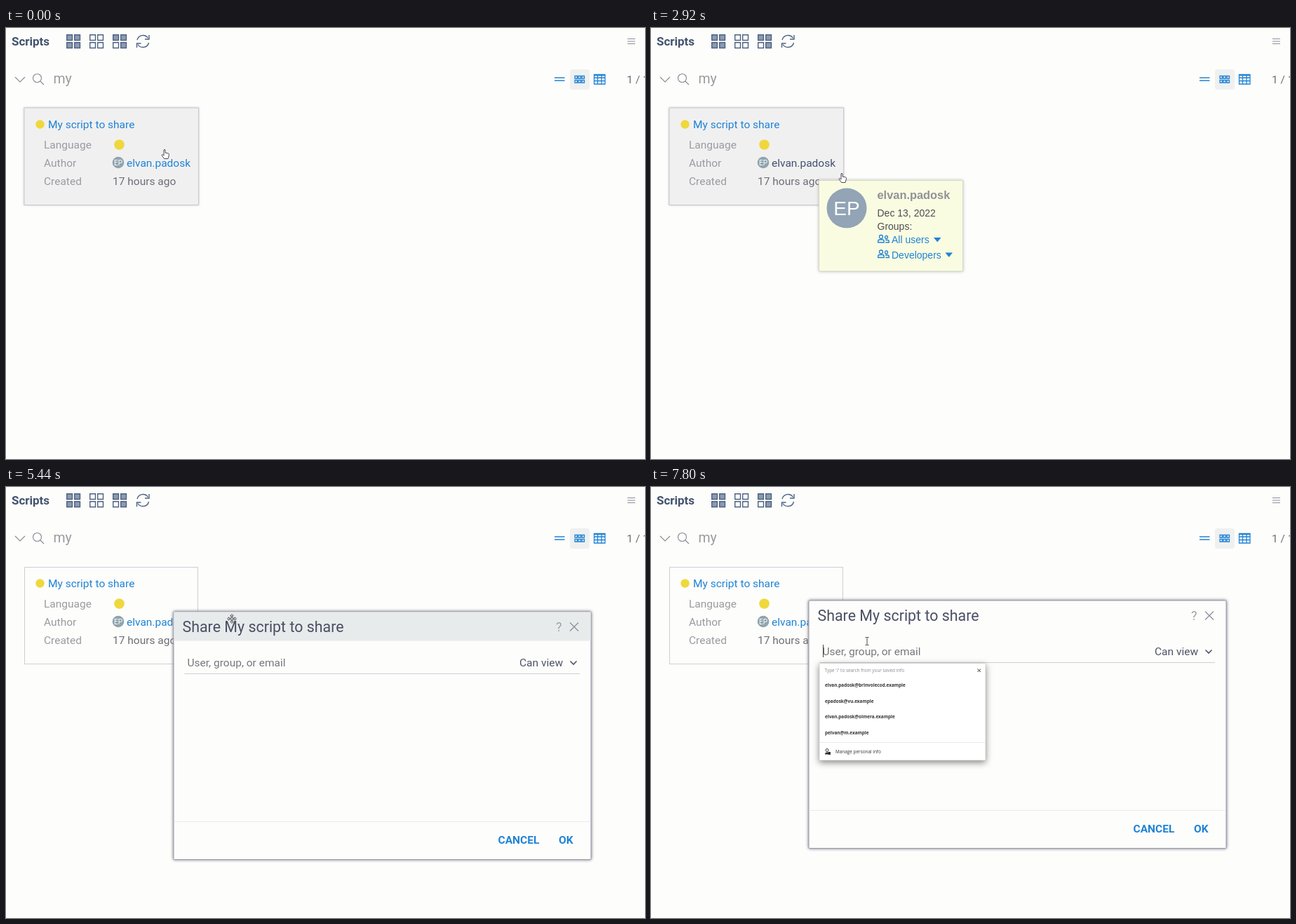
Write an HTML page that moves like this. It is 911x615 px and loops after 8 s.

```html
<!DOCTYPE html>
<html lang="en">
<head>
<meta charset="utf-8">
<title>Sharing a script</title>
<style>
  html, body { margin: 0; width: 100%; height: 100%; overflow: hidden; background: #fdfdfb; }
  svg { display: block; width: 911px; height: 615px; font: 15.5px Roboto, sans-serif; }
  text { white-space: pre; }
  .link { fill: #2083d5; }
  .label { fill: #9a9ba0; }
  .value { fill: #6d6e76; }
  .dark { fill: #42526e; }
  .bold { font-weight: 700; }
  .line { fill: none; stroke: #4d6282; stroke-width: 1.4; }
  .grey { fill: none; stroke: #8b8e98; stroke-width: 1.2; }
  .blue { fill: none; stroke: #2083d5; stroke-width: 1.3; }
  .arial { font-family: "Liberation Sans", Arial, sans-serif; font-size: 14px; }
  .small { font: 6.4px "Open Sans", "Noto Sans", sans-serif; fill: #333; }
  #menu { filter: drop-shadow(0 0 2px #9fb0c4aa); }
  #tip { filter: drop-shadow(0 0 2px #8888); }
  #dialog > .panel { filter: drop-shadow(0 0 2px #667); }
  #popup > .panel { filter: drop-shadow(0 3px 5px #0007); }
  #cardHover { filter: drop-shadow(0 0 1.5px #9999); }
  #cursor path { fill: #fff; stroke: #4a4a50; stroke-width: 1; stroke-linejoin: round; }
  #cursor .thin { fill: none; }
</style>
</head>
<body>
<svg viewBox="0 0 911 615">
  <defs>
    <path id="quad" d="M.7 9.7h7.8v7.8H.7zm11 0h7.8v7.8h-7.8zm-11 11h7.8v7.8H.7zm11 0h7.8v7.8h-7.8z"/>
    <g id="people" class="blue" stroke-width="1">
      <circle cx="5" cy="3" r="2.5"/><circle cx="12.5" cy="3.5" r="2"/>
      <path d="M.7 11V9.5q0-2.500 2.500-2.500h3.500q2.500 0 2.500 2.500V11zM11 7.500h3q2.300 0 2.300 2.200V11h-5"/>
    </g>
  </defs>

  <!-- toolbar -->
  <text x="8" y="25" class="dark bold" font-size="17">Scripts</text>
  <use href="#quad" x="86" class="line" style="fill:#8c9bb1"/>
  <use href="#quad" x="119" class="line"/>
  <path d="M153 10h8v8h-8zm11 0h8v8h-8zm0 11h8v8h-8z" fill="#8c9bb1"/>
  <use href="#quad" x="152" class="line"/>
  <path class="line" d="M187 17a8.500 8.500 0 0 1 15.500-2.500M204 10v6h-6M203.500 21a8.500 8.500 0 0 1-15.500 2.500M186.500 28v-6h6"/>
  <path class="grey" d="M886 15.500h11m-11 3.500h11m-11 3.500h11"/>

  <!-- search row -->
  <path class="grey" d="M13 70l7 7 7-7"/>
  <path class="grey" stroke-width="1.4" d="M50.500 71.500a6 6 0 1 0-12 0a6 6 0 1 0 12 0M49 76l5 5"/>
  <text x="67.500" y="79" class="label" font-size="19.500">my</text>
  <rect x="804" y="59" width="28" height="29" rx="4" fill="#eff0f0"/>
  <path class="blue" d="M782 71h14.500m-14.500 4h14.500"/>
  <path class="blue" stroke-width="1" d="M811 68.500h3.500v3.500H811zm5 0h3.500v3.500H816zm5 0h3.500v3.500H821zM811 74.500h3.500v3.500H811zm5 0h3.500v3.500H816zm5 0h3.500v3.500H821z"/>
  <path class="blue" d="M838.500 66.500h15.500v13.500h-15.500zm0 1h15.500m-15.500 3.500h15.500m-15.500 4.500h15.500M843.500 67v13m5.500-13v13"/>
  <text x="885" y="79" class="value">1 / 1</text>

  <!-- card -->
  <rect x="26.500" y="114.500" width="247" height="138" fill="none" stroke="#cdcfda"/>
  <rect id="cardHover" x="26" y="114" width="248.500" height="138.500" fill="#f0f0f1" stroke="#c9cad6"/>
  <circle cx="48.500" cy="137.500" r="6.200" fill="#efd83d"/>
  <text x="60" y="143" class="link">My script to share</text>
  <text x="54" y="171.500" class="label">Language</text>
  <circle cx="161.500" cy="166.500" r="7.300" fill="#efd83d"/>
  <text x="54" y="197.500" class="label">Author</text>
  <circle cx="160" cy="192" r="8.300" fill="#90a4ae"/>
  <text x="160" y="195.700" text-anchor="middle" font-size="10" fill="#fff">EP</text>
  <text id="author" x="172" y="197.500" class="link">elvan.padosk</text>
  <text x="54" y="223.500" class="label">Created</text>
  <text x="152" y="223.500" class="value">17 hours ago</text>

  <!-- context menu -->
  <g id="menu">
    <rect x="200.500" y="154.500" width="214" height="128" rx="1" fill="#e7ecee" stroke="#b3c1d1"/>
    <g class="dark">
      <text x="231.500" y="180.500">Run...</text>
      <text x="231.500" y="209.500">Share...</text>
      <text x="231.500" y="238">Edit...</text>
      <text x="231.500" y="267">Delete</text>
    </g>
  </g>

  <!-- author tooltip -->
  <g id="tip" class="arial">
    <rect x="239.500" y="217.500" width="205" height="129.500" fill="#fafce2" stroke="#d5d9c8"/>
    <circle cx="279" cy="257" r="28.500" fill="#92a4b5"/>
    <text x="279" y="266.500" text-anchor="middle" font-size="28" fill="#fff">EP</text>
    <text x="322.500" y="243.500" class="bold" font-size="16.400" fill="#919296">elvan.padosk</text>
    <text x="322.500" y="268.500" fill="#4d4d50">Dec 13, 2022</text>
    <text x="322.500" y="287.500" fill="#4d4d50">Groups:</text>
    <use href="#people" x="323" y="295"/>
    <use href="#people" x="323" y="316.500"/>
    <g class="link">
      <text x="343" y="307">All users</text>
      <text x="343" y="328.500">Developers</text>
      <path d="M403 299h10.500l-5.200 6.500zm16.500 21.500H430l-5.200 6.500z"/>
    </g>
  </g>

  <!-- share dialog, placed where it opens -->
  <g id="dialog">
    <rect class="panel" x="311" y="226" width="595" height="353.500" rx="1" fill="#fdfdfc" stroke="#9c9db0"/>
    <rect id="bar" x="311.500" y="226.500" width="594" height="41" fill="#e7ebec"/>
    <text x="323.500" y="254.500" font-size="21.400" fill="#4b4f64">Share My script to share</text>
    <text x="856" y="253.500" font-size="18" fill="#a0a2aa">?</text>
    <path class="grey" stroke="#a0a2aa" d="M876 241.500l12 12m0-12l-12 12"/>
    <text x="330.500" y="303.500" fill="#77787c">User, group, or email</text>
    <path id="caret" d="M331.500 289v18" stroke="#444"/>
    <text x="804" y="304" fill="#4f5366">Can view</text>
    <path d="M876.500 296.500l4.500 4.500 4.500-4.500" fill="none" stroke="#4f5366" stroke-width="1.600"/>
    <path d="M326.500 314.500h563.500" stroke="#cfd0d4"/>
    <path d="M311.500 525.500h594" stroke="#eaebef"/>
    <text x="773.500" y="557" class="link bold">CANCEL</text>
    <text x="860" y="557" class="link bold">OK</text>
  </g>

  <!-- saved entries -->
  <g id="popup" class="small">
    <rect class="panel" x="240" y="251.500" width="237" height="138.500" rx="1" fill="#fff" stroke="#c5c5c8" stroke-width=".6"/>
    <text x="247.500" y="264" fill="#888">Type '/' to search from your saved info</text>
    <path d="M465.500 259.500l4.500 4.500m0-4.500l-4.500 4.500" stroke="#333"/>
    <g class="bold">
      <text x="248" y="285.300">elvan.padosk@brinvolecod.example</text>
      <text x="248" y="307.800">epadosk@vu.example</text>
      <text x="248" y="330.300">elvan.padosk@olmera.example</text>
      <text x="248" y="352.800">pelvan@m.example</text>
    </g>
    <path d="M240.500 364.500h236" stroke="#e8e8ea"/>
    <circle cx="251" cy="375.500" r="2" fill="none" stroke="#333"/>
    <path d="M248 381.500q0-3 3-3h1.500v3zM252.500 378h3.500v4h-3.500z" fill="#333"/>
    <text x="263" y="379.800">Manage personal info</text>
  </g>

  <g id="cursor">
    <path id="hand" d="M-1 1q1-1.500 2 0v4l4.500 1q1.200.3 1 1.500L6 10l-1 3.500H-.5L-4 8.500q.3-1.500 1.500-.8L-1 9z"/>
    <path id="arrow" d="M.5.500v9.500l2.200-2 1.500 3.300 1.300-.6-1.400-3.200h3z"/>
    <path id="move" d="M0-6.500l2.200 2.300H.8v3.400h3.400v-1.400L6.500 0 4.200 2.200V.8H.8v3.400h1.400L0 6.500l-2.200-2.300h1.400V.8h-3.400v1.400L-6.500 0l2.300-2.200v1.400h3.400v-3.400h-1.400z"/>
    <path id="beam" class="thin" d="M-2.500-5.500h2l.5.500.5-.5h2M0-5V5m-2.500.5h2l.5-.5.5.5h2"/>
  </g>
</svg>
<script>
  const LOOP = 8000;
  const $ = id => document.getElementById(id);

  // each row: time, x, y
  const pointer = [
    [80, 226, 173], [160, 222, 169], [400, 222, 169], [640, 200, 154], [860, 200, 154],
    [1160, 212, 161], [1280, 212, 161], [1640, 229, 197], [2480, 229, 197],
    [2920, 272, 207], [3240, 390, 222], [4640, 390, 222], [4840, 393, 230],
    [4960, 394, 236], [5440, 322, 188], [5760, 309, 173], [7320, 309, 173], [7560, 308, 220]
  ];
  const drag = [[4960, 0, 0], [5440, -72, -48], [5760, -86, -64]];
  const shapes = [[0, "hand"], [780, "arrow"], [1720, "hand"], [2980, "arrow"], [4760, "move"], [7420, "beam"]];

  function along(path, t) {
    const i = path.findIndex(p => p[0] > t);
    if (i === 0) return path[0].slice(1);
    if (i < 0) return path[path.length - 1].slice(1);
    const [t0, x0, y0] = path[i - 1], [t1, x1, y1] = path[i];
    const k = (t - t0) / (t1 - t0);
    return [x0 + (x1 - x0) * k, y0 + (y1 - y0) * k];
  }

  const ramp = (t, from, to) => Math.min(1, Math.max(0, (t - from) / (to - from)));
  const fade = (id, value) => { $(id).style.opacity = value; };
  const place = (id, [x, y]) => $(id).setAttribute("transform", `translate(${x} ${y})`);
  const between = (t, from, to) => t >= from && t < to;

  function draw(t) {
    fade("cardHover", t < 1000 ? 1 - ramp(t, 780, 900) : ramp(t, 1720, 1840) - ramp(t, 2980, 3120));
    fade("menu", ramp(t, 720, 840) - ramp(t, 1700, 1760));
    fade("tip", ramp(t, 2080, 2320) - ramp(t, 2980, 3160));
    fade("dialog", ramp(t, 4160, 4440));
    fade("bar", ramp(t, 4850, 4960) - ramp(t, 7400, 7500));
    fade("caret", +(t < 4960 || t >= 7560));
    fade("popup", ramp(t, 7600, 7760));
    $("author").style.fill = between(t, 1760, 3000) ? "#42526e" : "";

    place("dialog", along(drag, t).map(Math.round));
    place("cursor", along(pointer, t).map(Math.round));
    const shape = shapes.filter(s => s[0] <= t).pop()[1];
    for (const el of $("cursor").children) el.style.display = el.id === shape ? "" : "none";
  }

  const start = performance.now();
  function tick() {
    draw((performance.now() - start) % LOOP);
    requestAnimationFrame(tick);
  }
  tick();
</script>
</body>
</html>
```
